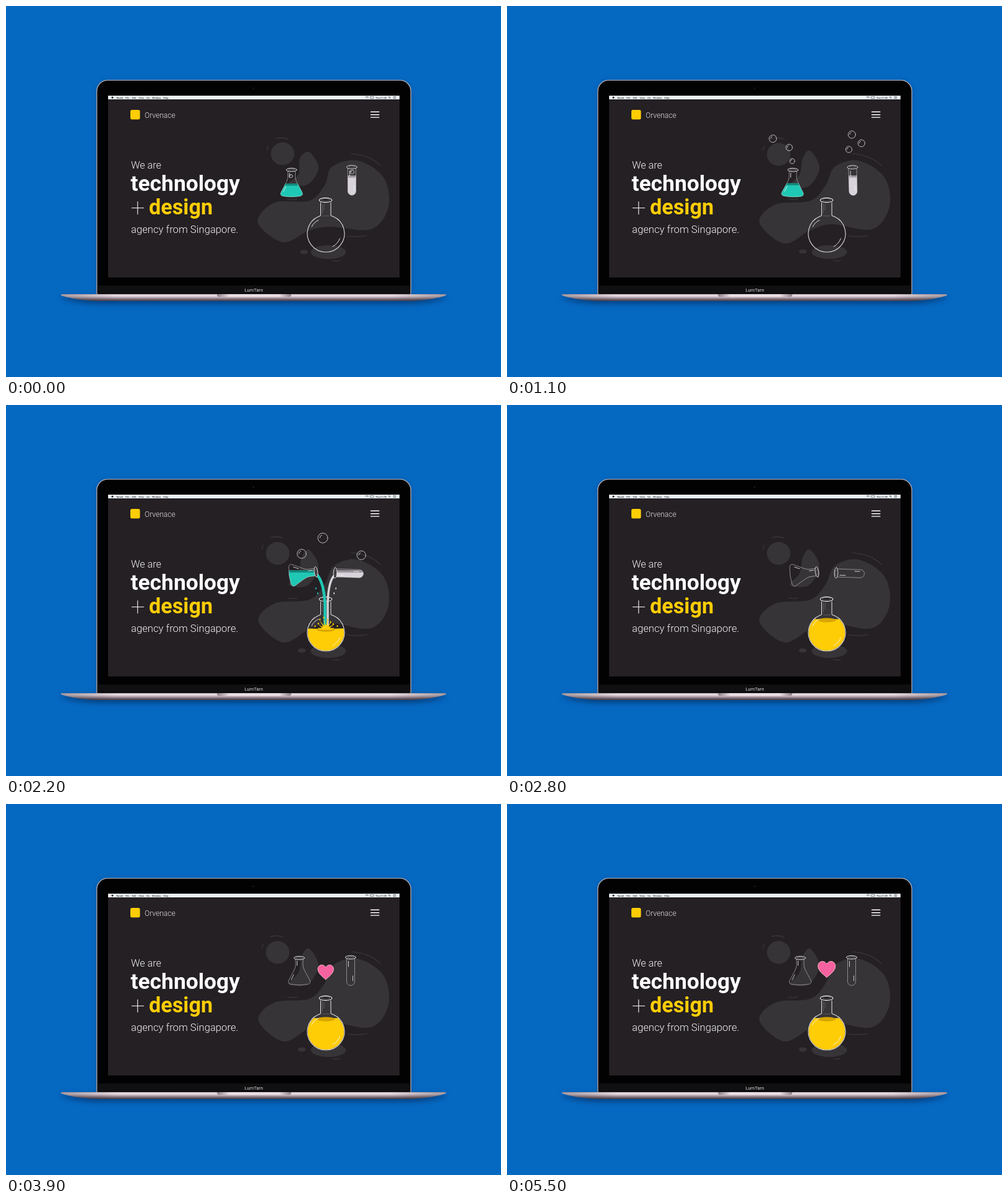
Write an HTML page with a canvas that moves like this. It is 800 by 600 pixels and loops after 5900 ms.

```html
<!DOCTYPE html>
<html lang="en">
<head>
<meta charset="utf-8">
<title>Agency site on a laptop</title>
<style>
html, body { margin: 0; width: 100%; height: 100%; overflow: hidden; background: #0568c1; }
canvas { display: block; }
</style>
</head>
<body>
<canvas id="stage" width="800" height="600"></canvas>
<script>
const LOOP = 5900, STEP = 100;
const ctx = document.getElementById('stage').getContext('2d');
const BG = '#242024', BLOB = '#363437', WHITE = '#f4f2f4', YELLOW = '#ffcd05';
const FONT = 'Roboto, "Open Sans", sans-serif';

const clamp = v => Math.max(0, Math.min(1, v));
const lerp = (a, b, u) => a + (b - a) * u;
const linear = (t, from, to) => clamp((t - from) / (to - from));
const ramp = (t, from, to) => {
  const u = linear(t, from, to);
  return u * u * (3 - 2 * u);
};

function random(seed) {
  const v = Math.sin(seed * 127.1 + 11.7) * 43758.5453;
  return v - Math.floor(v);
}

function box(x, y, w, h, r, fill) {
  ctx.beginPath();
  ctx.roundRect(x, y, w, h, r);
  ctx.fillStyle = fill;
  ctx.fill();
}

function oval(x, y, rx, ry, fill, stroke, width = 1) {
  ctx.beginPath();
  ctx.ellipse(x, y, rx, ry, 0, 0, Math.PI * 2);
  if (fill) { ctx.fillStyle = fill; ctx.fill(); }
  if (stroke) { ctx.strokeStyle = stroke; ctx.lineWidth = width; ctx.stroke(); }
}

function line(d, color, width) {
  ctx.strokeStyle = color;
  ctx.lineWidth = width;
  ctx.lineCap = 'round';
  ctx.stroke(new Path2D(d));
}

function label(str, x, y, size, weight, color, align = 'left') {
  ctx.font = `${weight} ${size}px ${FONT}`;
  ctx.fillStyle = color;
  ctx.textAlign = align;
  ctx.fillText(str, x, y);
  return ctx.measureText(str).width;
}

function clipped(region, draw) {
  ctx.save();
  ctx.clip(region);
  draw();
  ctx.restore();
}

function rectPath(x, y, w, h) {
  const p = new Path2D();
  p.rect(x, y, w, h);
  return p;
}

function shadowed(color, blur, drop, draw) {
  ctx.save();
  ctx.shadowColor = color;
  ctx.shadowBlur = blur;
  ctx.shadowOffsetY = drop;
  draw();
  ctx.restore();
}

function gradient(x0, y0, x1, y1, ...colors) {
  const g = ctx.createLinearGradient(x0, y0, x1, y1);
  colors.forEach((c, i) => g.addColorStop(i / (colors.length - 1), c));
  return g;
}

// Smooth closed curve through the points
function closedCurve(pts) {
  const n = pts.length, p = new Path2D();
  const at = i => pts[(i + n) % n];
  p.moveTo(...pts[0]);
  for (let i = 0; i < n; i++) {
    const a = at(i - 1), b = at(i), c = at(i + 1), d = at(i + 2);
    p.bezierCurveTo(b[0] + (c[0] - a[0]) / 6, b[1] + (c[1] - a[1]) / 6,
      c[0] - (d[0] - b[0]) / 6, c[1] - (d[1] - b[1]) / 6, c[0], c[1]);
  }
  return p;
}

function drawLaptop() {
  ctx.fillStyle = '#0568c1';
  ctx.fillRect(0, 0, 800, 600);

  shadowed('rgba(0,20,60,.18)', 8, 1, () => box(146, 119.4, 509, 348, [18, 18, 4, 4], '#a9a4ae'));
  box(147.4, 120.8, 506.2, 346, [17, 17, 3, 3], '#020203');
  box(148, 452, 505, 14, 0, '#100f11');
  oval(400, 133, 1.5, 1.5, '#16181d');
  label('LumTarn', 400.5, 461.5, 7.6, 400, '#d8d6d8', 'center');

  const base = new Path2D('M89 466H711V468C700 472 680 476 654 477H146C120 476 100 472 89 468Z');
  ctx.fillStyle = gradient(0, 466, 0, 478, '#cbbdc5', '#e9dfe4', '#c6b6bf', '#8f7f88', '#5b4e56', '#453a41');
  shadowed('rgba(0,15,50,.5)', 10, 4, () => ctx.fill(base));
  const edge = 'rgba(50,38,45,.35)', clear = 'rgba(50,38,45,0)';
  ctx.fillStyle = gradient(88, 0, 712, 0, edge, clear, clear, clear, clear, clear, clear, edge);
  ctx.fill(base);
  const dark = '#8b7c84', pale = '#e9dee2';
  box(341, 466, 120, 4.5, [0, 0, 4, 4], gradient(341, 0, 461, 0, dark, pale, pale, pale, pale, pale, dark));
}

function drawPage() {
  box(165, 145, 471, 294, 0, BG);
  box(165, 145, 471, 6, 0, '#eaf0f5');

  const ink = '#444';
  oval(172, 148, 1.6, 1.6, '#222');
  let x = 178;
  ['Torvel', 'File', 'Edit', 'View', 'Go', 'Window', 'Help'].forEach((word, i) => {
    x += label(word, x, 149.5, 4, i ? 500 : 700, ink) + 4;
  });
  label('Thu 21:00', 597, 149.5, 4, 500, ink);
  line('M581 147Q583.5 145.3 586 147M582 148.3Q583.5 147.2 585 148.3M589 146.5H594V149.5H589Z', ink, .6);
  oval(619.5, 147.5, 1.2, 1.2, null, ink, .6);
  line('M620.4 148.4L621.6 149.8M626 146.5H630M626 148H630M626 149.5H630', ink, .6);

  box(201, 168, 15.5, 15.5, 2.5, YELLOW);
  label('Orvenace', 224, 180.5, 12, 300, '#e4e2e4');
  for (let i = 0; i < 3; i++) box(589, 170.6 + i * 4.4, 14.5, 1.4, .5, '#fff');

  label('We are', 202, 263, 16.2, 300, WHITE);
  label('technology', 201.5, 299, 35.4, 700, '#fff');
  label('+', 201.5, 340, 41, 100, WHITE);
  label('design', 231, 337, 34.2, 700, YELLOW);
  label('agency from Singapore.', 202, 367, 16.7, 300, WHITE);
}

function drawBlobs(t) {
  const w = 1 - ramp(t, 0, 800);
  ctx.fillStyle = BLOB;
  ctx.fill(closedCurve([[408 - w, 350], [434, 321 - w * 3], [490, 315], [515, 290], [530 - w * 3, 260], [568, 250],
    [610, 277], [618, 325], [590, 361], [525, 353 + w * 4], [490, 363], [448, 384 - w * 2]]));
  ctx.fill(closedCurve([[490, 234 + w * 2], [505, 262], [487, 292 - w * 3], [457, 291 - w * 4], [473, 272], [478 - w * 3, 246]]));
  oval(439 + w * 8, 240 - w, 19, 18.5, BLOB);
  oval(521, 398, 28.5, 11, BLOB);
  oval(478 + w * 3.5, 397 + w, 6.5, 3.6, BLOB);

  line('M558 239Q588 241 605 258M552 372Q568 374 583 371.5M528 412Q534 413 539 411.5M455 312Q463 314 470 312', BLOB, 1.5);
  ctx.translate(w * 8, 0);
  line('M428 214.5Q438 211.5 447 215M416 227Q414 229 414 233', BLOB, 1.7);
  ctx.translate(w * -8, 0);
}

const conical = {
  shape: new Path2D('M-6 2V13Q-7 18 -10 23L-17 36Q-19.5 41 -14 42.5Q0 45 14 42.5Q19.5 41 17 36L10 23Q7 18 6 13V2Z'),
  shine: 'M-3.5 5V12M-9 27L-13 35',
  color: '#1fc8b4', dark: '#13897d',
  rest: [461.5, 265], pour: [501, 270], end: [474, 249], turn: 82, level: 287
};
const tube = {
  shape: new Path2D('M-6.5 2V39A6.5 6.5 0 0 0 6.5 39V2Z'),
  shine: 'M-3.5 6V15M3.5 30V38',
  color: '#d8d3da', dark: '#9b959e',
  rest: [559, 260.5], pour: [532, 271.5], end: [557, 248], turn: -88, level: 274
};

// Tips over to pour, drains, then swings back upright
function pose(v, t) {
  const tip = ramp(t, 1050, 1650), lean = ramp(t, 1650, 2200), back = ramp(t, 2900, 3900);
  return {
    x: lerp(lerp(v.rest[0], v.pour[0], tip), v.end[0], back),
    y: lerp(lerp(v.rest[1], v.pour[1], tip), v.end[1], ramp(t, 2900, 3600)),
    turn: v.turn * (.82 * tip + .18 * lean) * (1 - back),
    level: lerp(v.level, 272, tip) - 4.5 * lean + 32 * ramp(t, 2200, 2850)
  };
}

function drawVessel(v, t) {
  const { x, y, turn, level } = pose(v, t);
  if (t < 2850) {
    const inside = new Path2D();
    inside.addPath(v.shape, new DOMMatrix().translate(x, y).rotate(turn));
    clipped(inside, () => {
      box(x - 60, level, 120, 80, 0, v.color);
      box(x - 60, level, 120, 3.4, 0, v.dark);
    });
  }
  ctx.save();
  ctx.translate(x, y);
  ctx.rotate(turn * Math.PI / 180);
  ctx.strokeStyle = 'rgba(240,238,242,.6)';
  ctx.lineWidth = .8;
  ctx.stroke(v.shape);
  line(v.shine, WHITE, .8);
  oval(0, 0, 8.5, 2.8, '#1c191d', WHITE, .9);
  oval(0, -.3, 5.5, 1.2, null, '#8d8a8e', .7);
  ctx.restore();
}

// Bubbles rise at a steady speed, drifting sideways and growing
function drawBubble(age, life, x0, y0, drift, speed, growth, maxR) {
  if (age < 0 || age > life) return;
  const x = x0 + drift * age, y = y0 - speed * age, r = Math.min(maxR, 2.5 + growth * age);
  oval(x, y, r, r, null, '#cfcdd0', .9);
  ctx.beginPath();
  ctx.arc(x, y, r * .62, 3.2, 4.4);
  ctx.stroke();
}

function drawBubbles(t) {
  clipped(rectPath(165, 191, 471, 248), () => {
    const simmer = (start, x, drift, life = 2000) => drawBubble(t - start, life, x, 280, drift, .055, .003, 6);
    simmer(-90, 463, -.028);
    simmer(170, 470, -.015);
    simmer(570, 461, 0, 600);
    simmer(-210, 560, -.002);
    simmer(45, 558, .014);
    simmer(227, 556, -.004, 1200);
    const fizz = (start, x, drift) => drawBubble(t - start, 1200, x, 306, drift, .128, .0095, 8);
    fizz(1490, 522, -.014);
    fizz(1690, 509, -.061);
    fizz(1708, 530, .09);
  });
}

const fillLevel = t => lerp(398, 346, linear(t, 1720, 2400));

function drawStream(t, v, start, bend, endX, wide, thin) {
  const fallen = 114 * Math.pow(Math.max(0, (t - start) / 310), 1.25);
  const bottom = Math.min(272 + fallen, 386, fillLevel(t) + 2);
  const top = lerp(255, 362, linear(t, 2550, 2780));
  if (t <= start || top >= bottom) return;
  const { x, y } = pose(v, t), width = lerp(wide, thin, linear(t, 1700, 2000));
  clipped(rectPath(480, top, 75, bottom - top), () => {
    line(`M${x} ${y + 3}Q${bend} 283 ${endX} 320V${Math.max(320, bottom - width / 2)}`, v.color, width);
  });
}

function drawSplash(t) {
  const size = ramp(t, 1800, 2000) * (1 - ramp(t, 2450, 2700));
  if (!size) return;
  const y = fillLevel(t) + 2, pts = [];
  for (let i = 0; i <= 16; i++) {
    const a = Math.PI * (1 + i / 16);
    const r = (i % 2 ? 13 + 5 * random(i + t) : 7) * size;
    pts.push([517 + Math.cos(a) * r, y + Math.sin(a) * r]);
  }
  ctx.fillStyle = YELLOW;
  ctx.fill(closedCurve(pts));
  for (let i = 0; i < 8; i++) {
    const a = Math.PI * (1.1 + i * .115), r = (14 + 6 * random(i * 3 + t)) * size;
    oval(517 + Math.cos(a) * r, y + Math.sin(a) * r, 1.1, 1.5, YELLOW);
  }
}

// Small drops thrown off both sides of the streams
function drawDrops(t) {
  if (t < 1600 || t > 2600) return;
  const phase = t / 500 % 1;
  for (const [v, side] of [[conical, -1], [tube, 1]])
    for (let i = 0; i < 2; i++)
      oval(517 + side * (15 - i * 3 + 3 * phase), 295 + i * 8 + 4 * phase, .9, 1.9, v.color);
}

function drawBulb(t) {
  const level = fillLevel(t);
  if (t > 1720) {
    const inside = new Path2D();
    inside.arc(517, 368, 29.4, 0, Math.PI * 2);
    clipped(inside, () => {
      const slosh = 2 * Math.sin(t / 160 + 2) * (1 - linear(t, 2200, 2600));
      ctx.fillStyle = YELLOW;
      ctx.fill(new Path2D(`M485 ${level - slosh}Q517 ${level + 1} 549 ${level + slosh}V400H485Z`));
      oval(517, level + 2, 14.5, 3.4, '#d9a600');
    });
  }

  line('M508.5 318V338.5Q507.5 340 505 340.5A30 30 0 1 0 529 340.5Q526 340 525 338.5V318', '#dddbde', 1.1);
  line('M511.5 320V335M514 321V330M511.5 339.5H522.5', '#6f6c70', .7);
  line('M494 357Q498 349 505 346.5M528 389Q536 385 539.5 376', WHITE, .9);
  oval(516.5, 314, 10.3, 3.6, '#1c191d', WHITE, 1.1);
  oval(516.5, 313.6, 7, 1.8, null, '#8d8a8e', .7);

  drawStream(t, tube, 1450, 521, 520, 4.5, 3.5);
  drawStream(t, conical, 1390, 513, 515.5, 7.5, 4.5);
  drawSplash(t);
}

function drawHeart(t) {
  if (t < 3300) return;
  const u = linear(t, 3200, 4200);
  const rise = u < .5 ? 4 * u ** 3 : 1 - (2 - 2 * u) ** 3 / 2;
  const size = lerp(.15, 1, rise);
  ctx.save();
  ctx.translate(516.7, lerp(309, 267, rise));
  ctx.scale(size, size);
  const heart = 'M0 13.5C-5 9 -14 3 -14 -5C-14 -13 -4 -15.5 0 -8C4 -15.5 14 -13 14 -5C14 3 5 9 0 13.5Z';
  ctx.fillStyle = '#f6619f';
  ctx.fill(new Path2D(heart));
  line(heart, '#ffc4cf', .9);
  ctx.restore();
}

function render(t) {
  drawLaptop();
  drawPage();
  drawBlobs(t);
  drawBulb(t);
  drawVessel(conical, t);
  drawVessel(tube, t);
  drawDrops(t);
  drawBubbles(t);
  drawHeart(t);
}

const begin = performance.now();
function tick(now) {
  const t = Math.max(0, now - begin) % LOOP;
  render(Math.floor(t / STEP) * STEP);
  requestAnimationFrame(tick);
}
render(0);
requestAnimationFrame(tick);
</script>
</body>
</html>
```
